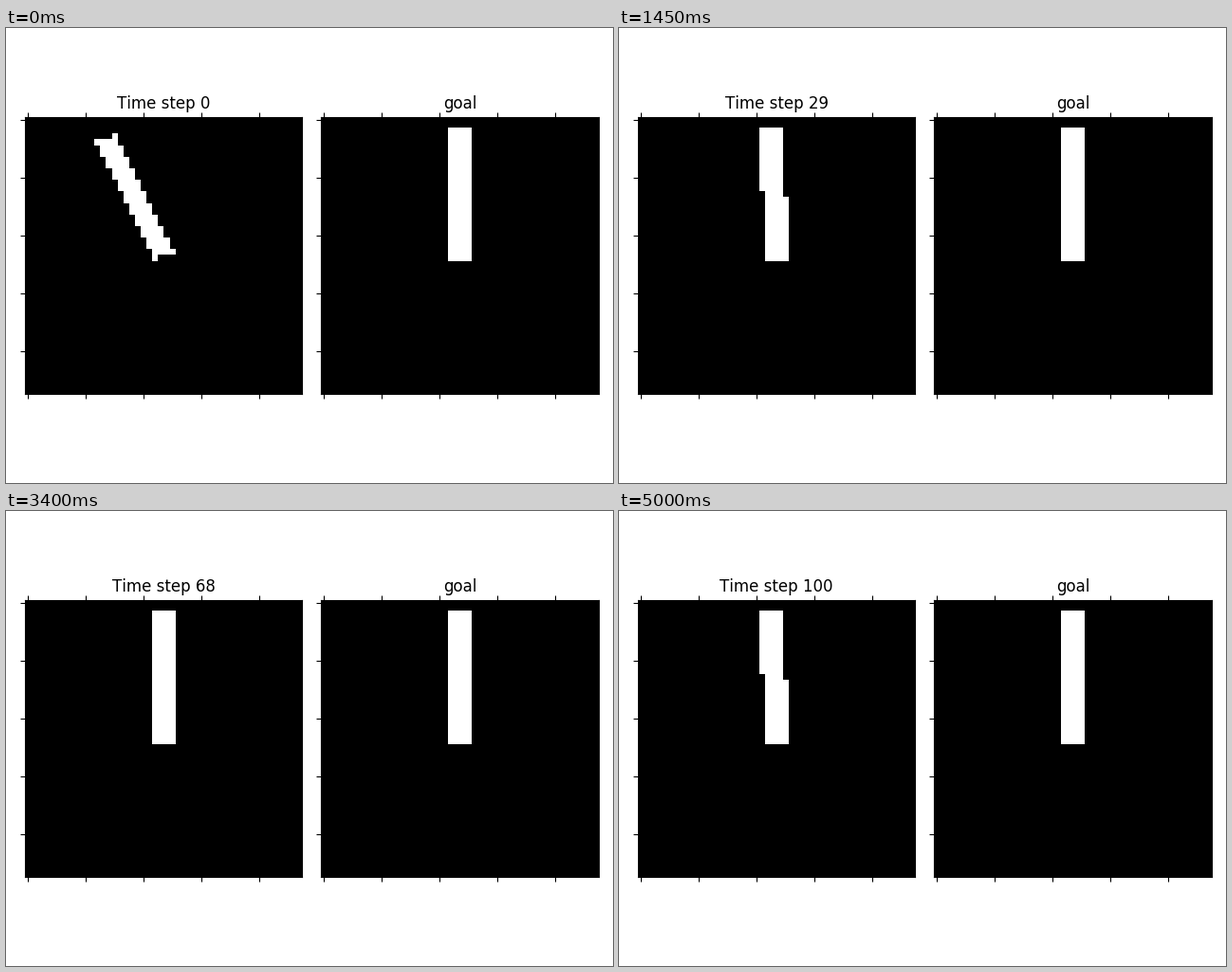
Recreate the animation shown at these times as a matplotlib script. Size 640x480 px, loop 5.05 s.

```python
import math

import matplotlib.pyplot as plt
import numpy as np
from matplotlib.animation import FuncAnimation

W, H, DPI = 640, 480, 100
GRID = 48
STEPS = 101
INTERVAL = 50

# Rod geometry in cells
PIVOT_X, PIVOT_Y = 24.0, 24.18
LENGTH, HALF_WIDTH = 22.1, 1.5

plt.rcParams["text.kerning_factor"] = 6


def wave(step, period, peak=0):
    return math.cos(2 * math.pi * (step - peak) / period)


def tip_offset(step):
    """Sideways offset of the tip: a damped swing up, then swaying."""
    swing = 10.44 * math.exp(-step / 8) * wave(step, 52)
    sway = (1.2 + 0.6 * wave(step, 48, 40)) * wave(step, 12, 40)
    return -swing - sway


def rod_corners(offset):
    s = offset / LENGTH
    c = math.sqrt(1 - s * s)
    corners = []
    for along, across in ((0, -1), (LENGTH, -1), (LENGTH, 1), (0, 1)):
        side = across * HALF_WIDTH
        x = PIVOT_X + along * s + side * c
        y = PIVOT_Y - along * c + side * s
        corners.append((int(x), int(y)))
    return corners


def fill_polygon(points):
    image = np.zeros((GRID, GRID))
    edges = list(zip(points, points[1:] + points[:1]))
    for y in range(GRID):
        xs = []
        for (x0, y0), (x1, y1) in edges:
            if y0 == y1 == y:
                xs += [x0, x1]
            elif y0 != y1 and min(y0, y1) <= y <= max(y0, y1):
                xs.append(x0 + (y - y0) * (x1 - x0) / (y1 - y0))
        if xs:
            left = math.floor(min(xs) + 0.5)
            right = max(math.ceil(max(xs) - 0.5), left)
            image[y, left:right + 1] = 1
    return image


def rod_image(offset):
    return fill_polygon(rod_corners(offset))


def add_panel(fig, left, size, title):
    bottom = (H - size) / 2
    ax = fig.add_axes([left / W, bottom / H, size / W, size / H])
    picture = ax.matshow(rod_image(0), cmap="gray", vmin=0, vmax=1)
    ticks = range(0, GRID, 10)
    ax.set_xticks(ticks, labels=[])
    ax.set_yticks(ticks, labels=[])
    return picture, ax.set_title(title, y=1.0)


fig = plt.figure(figsize=(W / DPI, H / DPI), dpi=DPI, facecolor="white")

margin = 10.8 * DPI / 72
gap = margin + 3.5 * DPI / 72
size = (W - margin - 2 * gap) / 2 - 0.01  # keeps the edge off a half pixel

picture, title = add_panel(fig, gap, size, "Time step 0")
add_panel(fig, W - margin - size, size, "goal")


def update(step):
    picture.set_data(rod_image(tip_offset(step)))
    title.set_text(f"Time step {step}")
    return picture, title


anim = FuncAnimation(fig, update, frames=STEPS, interval=INTERVAL,
                     repeat=True, repeat_delay=0, blit=False)
plt.show()
```
